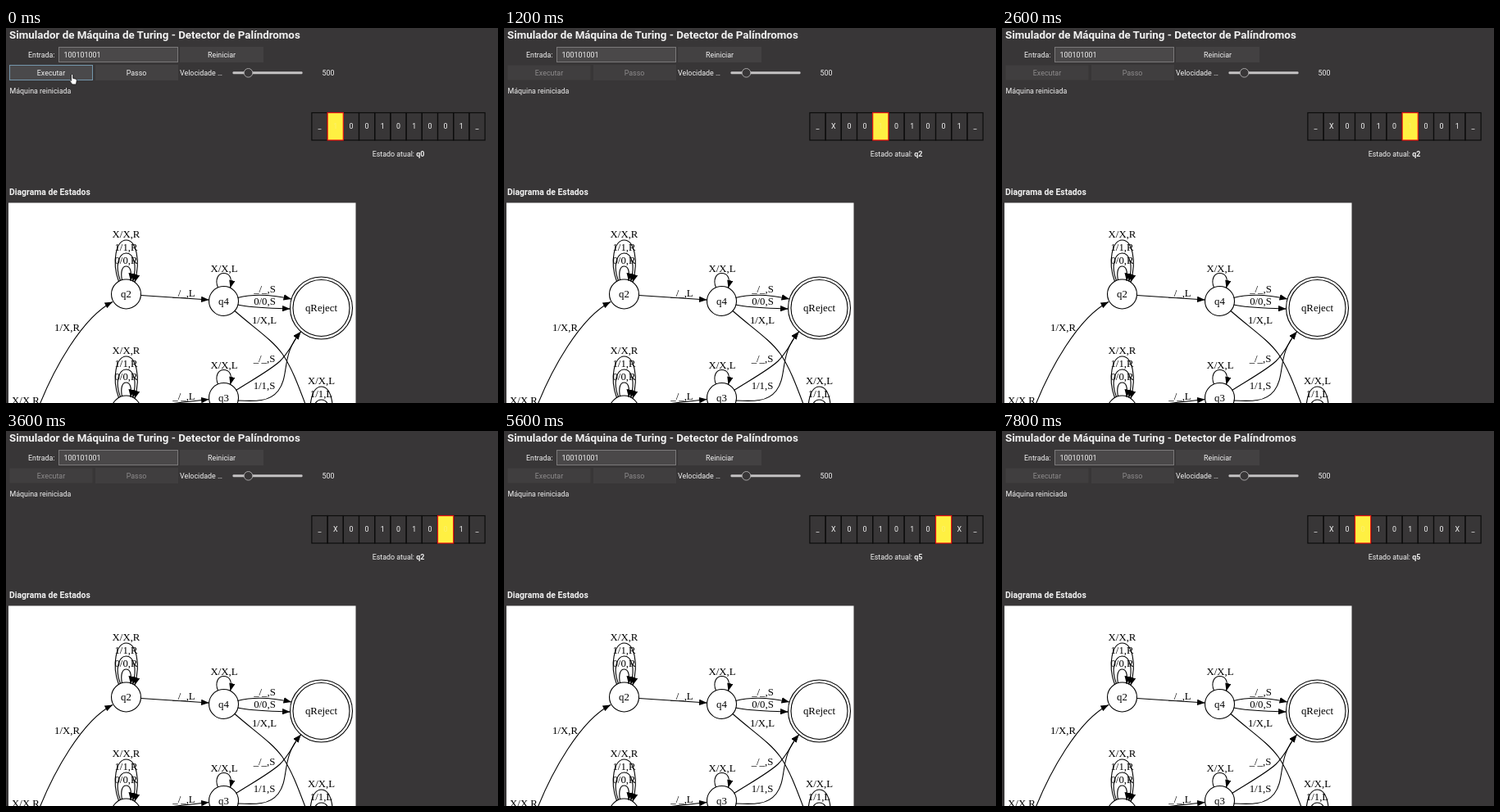
Animation, 600 px wide and 458 px high, one loop 8000 ms. Source, as an HTML page:

```html
<!DOCTYPE html>
<html lang="pt">
<head>
<meta charset="utf-8">
<title>Máquina de Turing</title>
<style>
  html, body { margin: 0; width: 100%; height: 100%; overflow: hidden; background: #383637; }
  svg { display: block; width: 600px; height: 458px; font: 8.9px Roboto, sans-serif; fill: #f2f2f2; }
  .mid { text-anchor: middle; }
  .bold { font-weight: bold; }
  .button { fill: #434142; }
  .graph { font: 12.8px "Liberation Serif", serif; fill: #000; text-anchor: middle; }
  .graph path, .graph circle { fill: none; stroke: #000; stroke-width: 1.1; }
  .graph .edge { marker-end: url(#arrow); }
  .cell { fill: none; stroke: #0c0c0c; stroke-width: 1.2; }
  .head { fill: #fff042; stroke: #f01414; stroke-width: 1.2; }
  .running .control { fill: #403e3f; stroke: none; }
  .running .label { fill: #8d8b8c; }
  .running .pointer { display: none; }
</style>
</head>
<body>
<svg id="stage" viewBox="0 0 600 458">
  <defs>
    <marker id="arrow" viewBox="0 0 9 7" refX="9" refY="3.5" markerWidth="9.5" markerHeight="7.4"
            markerUnits="userSpaceOnUse" orient="auto"><path d="M0 0L9 3.5L0 7z" style="fill:#000;stroke:none"/></marker>
    <clipPath id="panel"><rect x="3" y="213.5" width="423.5" height="245"/></clipPath>
  </defs>

  <text class="bold" x="4" y="13" font-size="13.33">Simulador de Máquina de Turing - Detector de Palíndromos</text>
  <text x="59.5" y="36" text-anchor="end">Entrada:</text>
  <rect x="64.5" y="23.5" width="145" height="18" fill="#4a4849" stroke="#7b797a"/>
  <text x="70.5" y="36">100101001</text>
  <rect class="button" x="212" y="23" width="102" height="19"/>
  <text class="mid" x="263" y="36">Reiniciar</text>
  <rect class="control" x="4.5" y="45.5" width="101" height="18" fill="#4a494b" stroke="#7496ab"/>
  <text class="mid label" x="55" y="58">Executar</text>
  <rect class="button control" x="109" y="45" width="101" height="19"/>
  <text class="mid label" x="159" y="58">Passo</text>
  <text x="212" y="58">Velocidade …</text>
  <rect x="276.5" y="53.2" width="85" height="3" rx="1" fill="#c4c2c3"/>
  <circle cx="295.5" cy="54.8" r="5.3" fill="#383637" stroke="#a9a7a8"/>
  <text x="385.5" y="58">500</text>
  <text x="4.5" y="80">Máquina reiniciada</text>
  <path class="pointer" fill="#fff" stroke="#111" stroke-width=".8"
        d="M79.5 57q1.3-1.3 2.2.2v4.2l3.5.8q1.3.4 1.1 2l-.8 4.7h-4.6l-3.2-4.2q.3-1.4 1.8-.2z"/>

  <g id="tape"></g>
  <text class="mid" x="478.5" y="157">Estado atual: <tspan class="bold" id="state"></tspan></text>
  <text class="bold" x="4" y="204" font-size="10.4">Diagrama de Estados</text>
  <rect x="3" y="213.5" width="423.5" height="245" fill="#fff"/>
  <g class="graph" id="graph" clip-path="url(#panel)"></g>
</svg>
<script>
const byId = id => document.getElementById(id);

const label = (x, y, s) => `<text x="${x}" y="${y}">${s}</text>`;
const edge = d => `<path class="edge" d="${d}"/>`;
const circle = (x, y, r) => `<circle cx="${x}" cy="${y}" r="${r}"/>`;
const node = (x, y, r, name) => circle(x, y, r) + label(x, y + 4, name);

// Node with three nested self loops, moving the head towards `dir`.
const tripleLoop = (x, y, name, dir) => `<g transform="translate(${x} ${y})">` +
  node(0, 0, 18, name) +
  edge("M-5-17C-7-27-5-34 0-34C5-34 7-28 5.5-16") +
  edge("M-7-16.5C-14-34-9-50 0-50C9-50 14-36 8-15.5") +
  edge("M-9-15.5C-18-40-12-66 0-66C12-66 18-42 10.5-14.5") +
  ["X/X", "1/1", "0/0"].map((rule, i) => label(0, -69 + 16 * i, rule + "," + dir)).join("") + "</g>";

const singleLoop = (x, y, name) => `<g transform="translate(${x} ${y})">` +
  node(0, 0, 18, name) + edge("M-7-16.5C-11-26-7-34 0-34C7-34 11-28 8-16") + label(.5, -36, "X/X,L") + "</g>";

byId("graph").innerHTML =
  tripleLoop(146.5, 325, "q2", "R") +
  tripleLoop(146.5, 467, "q1", "R") +
  tripleLoop(384.5, 504, "q5", "L") +
  singleLoop(265.5, 333.5, "q4") +
  singleLoop(265.5, 451.5, "q3") +
  circle(384.5, 342, 38) + node(384.5, 342, 34.5, "qReject") +
  edge("M41 460C58 418 92 354 130 334.5") + label(74.5, 370, "1/X,R") + label(24, 459, "X/X,R") +
  edge("M164.5 326.5L247.5 332") + label(217, 327.5, "_/_,L") +
  edge("M164.5 463L247.5 453.5") + label(217, 454, "_/_,L") +
  edge("M282.5 329.5C300 325 322 325 348 331") + label(315.5, 322.5, "_/_,S") +
  edge("M282.5 338C300 342 322 342 346.5 343") + label(315.5, 338, "0/0,S") +
  edge("M279 345.5C302 366 324 380 337 398C350 417 358 441 371 475") + label(315, 360.5, "1/X,L") +
  edge("M280.5 442.5C300 430 322 418 334 407C346 395 350 383 359.5 371") + label(315, 407.5, "_/_,S") +
  edge("M282.5 455C304 456 321 457 332 443C346 425 335 399 359.5 371") + label(315, 441, "1/1,S");

const LOOP = 8000, FRAME = 200, STEP = 503, FIRST_STEP = 190;
const LEFT = 372.9, PITCH = 19.2, TOP = 103.5, HEIGHT = 33.5;
const LAST_CELL = 10, TURN = 9;   // the head reaches the right end after TURN steps

function machineAt(step) {
  const tape = [..."_100101001_"];
  if (step > 0) tape[1] = "X";
  if (step > TURN + 1) tape[9] = "X";
  return {
    tape,
    head: step <= TURN ? 1 + step : LAST_CELL - (step - TURN),
    state: step === 0 ? "q0" : step <= TURN ? "q2" : step === TURN + 1 ? "q4" : "q5"
  };
}

function draw(step) {
  const { tape, head, state } = machineAt(step);
  const box = (i, cls) =>
    `<rect class="${cls}" x="${LEFT + i * PITCH}" y="${TOP}" width="${PITCH}" height="${HEIGHT}"/>`;
  byId("tape").innerHTML =
    tape.map((_, i) => box(i, "cell")).join("") + box(head, "head") +
    tape.map((symbol, i) =>
      `<text class="mid" x="${LEFT + (i + .5) * PITCH}" y="123" opacity="${i === head ? .25 : 1}">${symbol}</text>`).join("");
  byId("state").textContent = state;
  byId("stage").classList.toggle("running", step > 0);
}

let shown = -1;
function tick() {
  const time = Math.floor(performance.now() % LOOP / FRAME) * FRAME;
  const step = Math.floor((time + STEP - FIRST_STEP) / STEP);
  if (step !== shown) draw(shown = step);
  requestAnimationFrame(tick);
}
tick();
</script>
</body>
</html>
```
